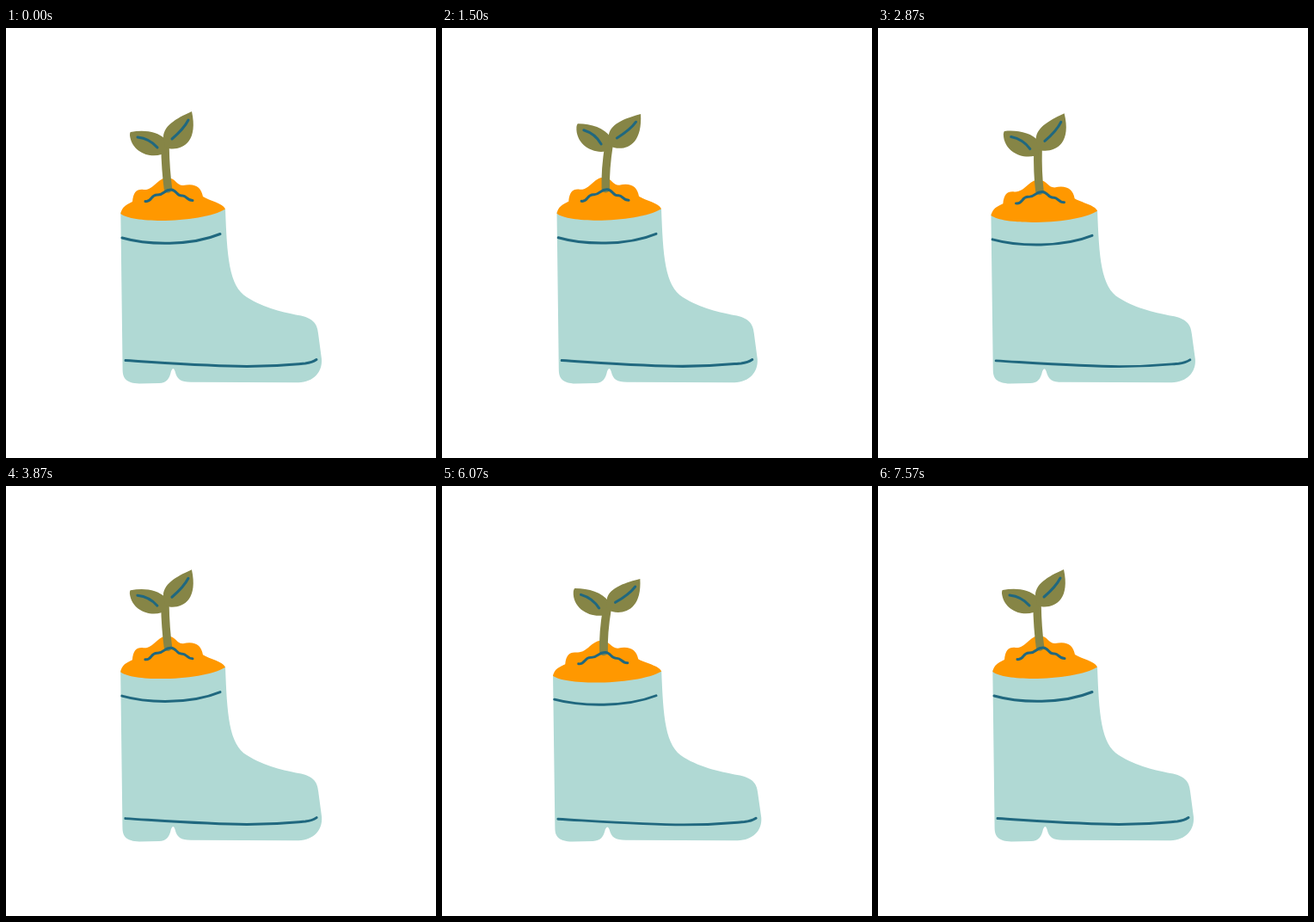
An HTML page with a canvas that plays this animation: 500x500 px, repeating every 7.61 s.

```html
<!DOCTYPE html>
<html lang="en">
<head>
<meta charset="utf-8">
<title>Boot sprout</title>
<style>
  html, body { margin: 0; width: 100%; height: 100%; overflow: hidden; background: #fff; }
  canvas { display: block; width: 100vmin; height: 100vmin; }
</style>
</head>
<body>
<canvas id="stage" width="500" height="500"></canvas>
<script>
const ctx = document.getElementById('stage').getContext('2d');

const LOOP = 7610, LAST = 189, CYCLE = 95, HALF = 48;
const STEPS = [70, 100, 130, 170];   // 25 fps shown on a 30 fps clock
const FLOOR = 413, MID = 250;
const BOOT = '#b0d9d4', SOIL = '#ff9800', LEAF = '#868546', INK = '#20687f';

const boot = new Path2D('M133.3 214 C150 226 230 226 255 210 C257 265 259 300 280 313 ' +
  'C300 326 325 331 340 334 C357 337 362 344 363 355 L367 385 C368 400 358 411.5 340 412.3 ' +
  'L215 411.8 C203 411.5 199 409 196.5 399 Q194.5 393 192 399 C190 408 187 412.6 178 413 ' +
  'L155 413.6 C140 412.6 135.6 408 135.6 397 Z');
const soil = new Path2D('M133.3 216 C135 207.5 140 205.5 147 202 C148 191 152 187 160 188 ' +
  'C172 189 176 174 188 174 C198 175 198 183 206 183 C220 180 227 185 229 196 ' +
  'C237 201 252 203.5 255 210.5 C232 225.7 150 228.7 133.3 216 Z');
const crack = new Path2D('M162 201.6 C170 202.6 168 193.6 176 194 C184 194.4 184 187.5 192 188 ' +
  'C199 188.5 198 195.4 205 195 C210 194.6 210 200.5 217 200.5');
const cuff = new Path2D('M135 244 C165 252.5 215 253.5 249 239.5');
const sole = new Path2D('M139 386.6 C200 390.4 240 393.4 280 393.4 S340 390.4 348 390 Q356 389 361 385.6');

// Leaves are drawn around the point where they meet the stem.
const leftLeaf = {
  shape: new Path2D('M-40 -17 C-25 -20 -9 -18 0 -9 L3 5 C-10 16 -38 10 -41 -13 Q-41 -17 -40 -17 Z'),
  vein: new Path2D('M-32 -11 Q-18 -9.5 -9 1')
};
const rightLeaf = {
  shape: new Path2D('M31 -41 C18 -35 -2 -26 -2 -11 L0 1 C14 6 40 0 31 -41 Z'),
  vein: new Path2D('M27 -31 Q22 -21 8 -9')
};

// [frame, squash]: positive is wide and low, negative is thin and tall
const bounce = [[0, 0], [8.5, 0.037], [15.5, -0.04], [24, 0.018], [32, -0.006], [40, 0]];

function ease(x) {
  x = Math.min(1, Math.max(0, x));
  return (1 - Math.cos(Math.PI * x)) / 2;
}

function squashAt(f) {
  for (let i = 1; i < bounce.length; i++) {
    const [a, from] = bounce[i - 1], [b, to] = bounce[i];
    if (f <= b) return from + (to - from) * ease((f - a) / (b - a));
  }
  return 0;
}

function frameAt(t) {
  const rest = t % 200;
  const n = 5 * Math.floor(t / 200) + STEPS.filter(s => rest >= s).length;
  return Math.min(n, LAST) % CYCLE;
}

function fill(path, color) {
  ctx.fillStyle = color;
  ctx.fill(path);
}

function line(path, color = INK, width = 3) {
  ctx.strokeStyle = color;
  ctx.lineWidth = width;
  ctx.stroke(path);
}

function drawLeaf(leaf, x, y, degrees) {
  ctx.save();
  ctx.translate(x, y);
  ctx.rotate(degrees * Math.PI / 180);
  fill(leaf.shape, LEAF);
  line(leaf.vein);
  ctx.restore();
}

function drawPlant(lean, lift) {
  const x = 185 + 9 * lean, y = 138 - 2 * lean;
  const stem = new Path2D();
  stem.moveTo(x, y);
  stem.quadraticCurveTo(185.5 + 4 * lean, 165, 188.5 + 1.7 * lean, 187);
  line(stem, LEAF, 9.5);
  drawLeaf(leftLeaf, x, y, 11 * lean + lift);
  drawLeaf(rightLeaf, x, y, 9 * lean - lift);
}

function draw(n) {
  const back = n >= HALF;
  const f = back ? n - HALF : n;
  const s = squashAt(f);
  const swing = ease((f - 12) / 16);

  ctx.setTransform(1, 0, 0, 1, 0, 0);
  ctx.fillStyle = '#fff';
  ctx.fillRect(0, 0, 500, 500);
  ctx.lineJoin = ctx.lineCap = 'round';
  ctx.translate(MID, FLOOR);
  ctx.scale(1 + s, 1 - 0.67 * s);
  ctx.translate(-MID, -FLOOR);

  fill(boot, BOOT);
  fill(soil, SOIL);
  drawPlant(back ? 1 - swing : swing, 5 * Math.sin(Math.PI * swing));
  [crack, cuff, sole].forEach(path => line(path));
}

const start = performance.now();
function tick() {
  draw(frameAt((performance.now() - start) % LOOP));
  requestAnimationFrame(tick);
}
tick();
</script>
</body>
</html>
```
